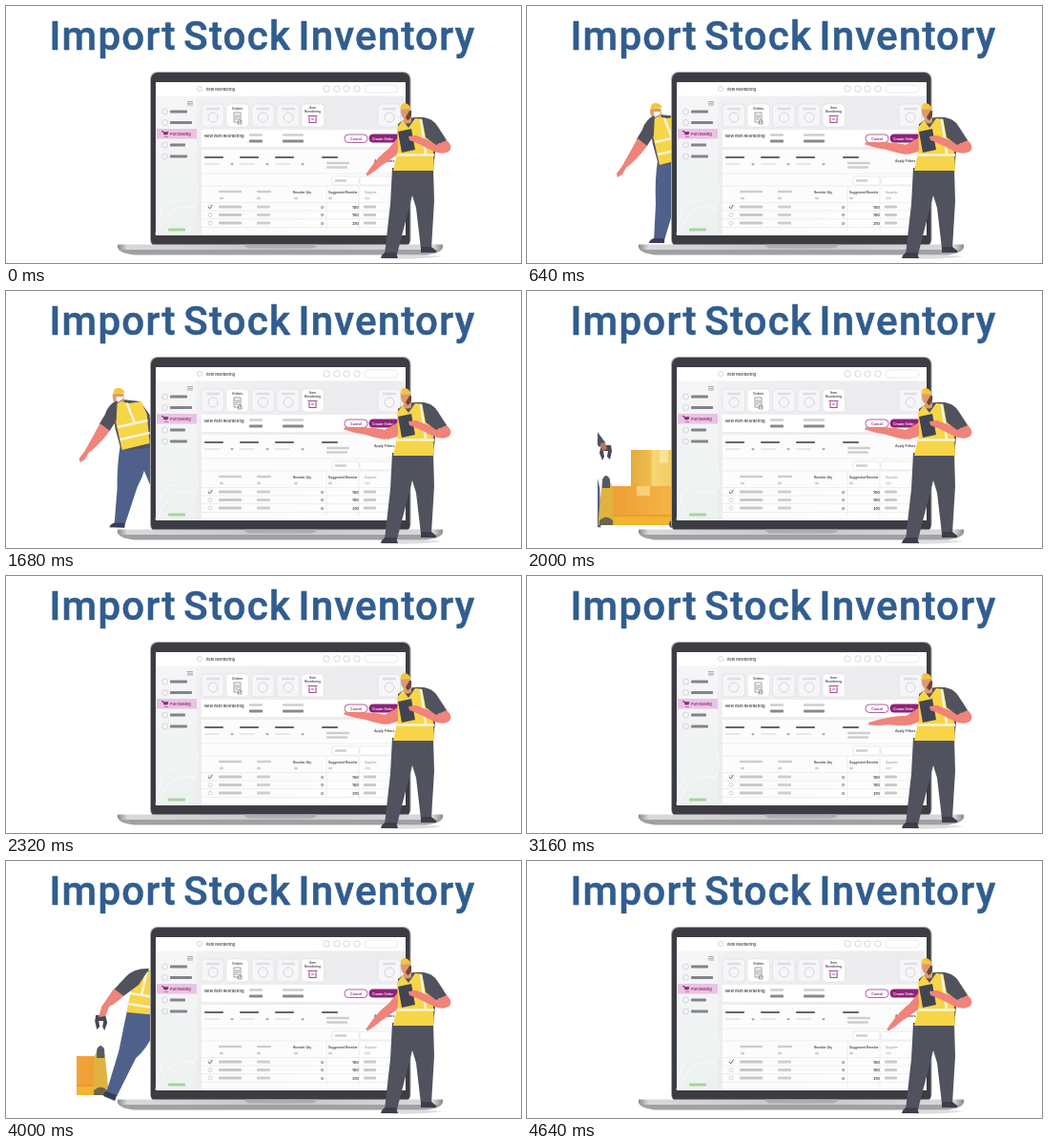
Animation of 540 by 270 pixels, one loop 9600 ms. Source, as an HTML page:

```html
<!DOCTYPE html>
<html lang="en">
<head>
<meta charset="utf-8">
<title>Import Stock Inventory</title>
<style>
html, body { margin: 0; width: 100%; height: 100%; overflow: hidden; background: #fff; }
svg { display: block; width: 100%; height: 100%; }
.title { font: 500 42px Roboto, sans-serif; letter-spacing: 1.25px; word-spacing: -4.2px; fill: #315d8f; stroke: #315d8f; stroke-width: .6; }
.ui text { font: 600 4.6px Inter, sans-serif; fill: #45424a; }
.blue { fill: #4f618b; }
.shoe { fill: #343e57; }
.vest { fill: #f7d548; }
.skin { fill: #f0837a; }
.face { fill: #dc9a70; }
.hat { fill: #f5c53a; }
.dark { fill: #50535e; }
.tape { fill: none; stroke: #f6f3dc; stroke-width: 2.6; }
</style>
</head>
<body>
<svg viewBox="0 0 540 270">
  <defs>
    <clipPath id="left"><rect x="74" y="95" width="300" height="165"/></clipPath>
    <linearGradient id="silver">
      <stop offset="0" stop-color="#88898c"/><stop offset=".03" stop-color="#d9d9db"/>
      <stop offset=".5" stop-color="#c6c6c8"/><stop offset=".97" stop-color="#d9d9db"/>
      <stop offset="1" stop-color="#88898c"/>
    </linearGradient>
    <linearGradient id="box">
      <stop offset="0" stop-color="#e3ad3c"/><stop offset=".38" stop-color="#edbd50"/>
      <stop offset=".42" stop-color="#f6d775"/><stop offset="1" stop-color="#f1c659"/>
    </linearGradient>
    <linearGradient id="crate">
      <stop offset="0" stop-color="#ef9d35"/><stop offset="1" stop-color="#f5b848"/>
    </linearGradient>
    <linearGradient id="panel" x2="1" y2="1">
      <stop offset="0" stop-color="#f4f2f5"/><stop offset=".5" stop-color="#ecebee"/>
      <stop offset="1" stop-color="#f5f4f6"/>
    </linearGradient>
    <linearGradient id="side" x2="0" y2="1">
      <stop offset="0" stop-color="#f7f6f8"/><stop offset="1" stop-color="#ecf2f0"/>
    </linearGradient>
    <g id="cart">
      <path d="M-5 162H5L6 168L4 177L1 174L2 168H-3L-2 174L-4 178L-7 170Z" fill="#454955"/>
      <rect x="26" y="167" width="54" height="38" fill="url(#box)"/>
      <path d="M56 167v14h9v-14z" fill="#f9e39a"/>
      <rect x="3" y="205" width="77" height="31" fill="url(#crate)"/>
      <path d="M32 205v10h14v-10z" fill="#f9cf78"/>
      <path d="M3 236H80V246H3Z" fill="#f2b431"/>
      <path d="M3 236H80" stroke="#d99323"/>
      <path d="M-5 208Q-5 198 0 198T7 208V238L10 246H-8V238Z" fill="#e0b340"/>
      <path d="M-4 198Q0 190 4 198V207H-4Z" fill="#56596a"/>
      <path d="M-7 241Q0 234 7 241V246H-7Z" fill="#6b6449"/>
      <circle cx="70" cy="245" r="4" fill="#4a4d57"/>
    </g>
  </defs>

  <text class="title" x="45.5" y="46">Import Stock Inventory</text>

  <g clip-path="url(#left)">
    <g id="leaver">
      <path id="rearLeg" class="blue" d="M136 164L152 162L166 205L171 246H159L153 208Z"/>
      <use href="#cart" x="169"/>
      <g id="frontLeg" class="blue"><path d="M121 163L152 161Q150 186 140 206L128 246H117L119 208Q118 182 121 163Z"/>
        <path class="shoe" d="M117 244h11v5h-16q0-3 5-5z"/></g>
      <path class="dark" d="M138 117Q149 121 154 140L168 159L162 164L148 148Z"/>
      <path d="M163 160l5-1l2 7l-5 2z" fill="#bd7562"/>
      <path class="dark" d="M112 120L124 114L142 116L152 130L153 165L122 167L116 145Z"/>
      <path class="face" d="M117 111h8v9h-8zM113 108q0 10 5 10q6-1 7-10z"/>
      <path class="hat" d="M114 107Q114 102 119 102T126 107L113 109Z"/>
      <path class="vest" d="M113 122L121 116L131 118L143 116L149 129L152 160L123 167L117 140Z"/>
      <path class="tape" d="M118 143L150 136M121 156L152 149M128 118L136 138"/>
      <path class="dark" d="M118 115Q109 118 105 130L99 140L110 147L117 136Z"/>
      <path class="skin" d="M100 139L110 147Q99 162 88 170L84 177L79 180L78 176L84 168Z"/>
    </g>
    <g id="comer">
      <use href="#cart" transform="matrix(-1 0 0 1 99 0)"/>
      <path class="blue" d="M148 165L172 162L176 204L180 246H169L164 208Z"/>
      <path class="blue" d="M127 156H160L154 182Q147 198 136 207L116 247L105 243L118 200Z"/>
      <path class="shoe" d="M105 242l11 4l-2 6l-12-5q0-4 3-5z"/>
      <path class="dark" d="M137 116Q150 112 164 120L160 160H128Z"/>
      <path class="vest" d="M134 122L151 115L165 121L160 162L126 159Z"/>
      <path class="tape" d="M130 139L162 144M128 150L160 155M147 117L142 141"/>
      <path class="face" d="M152 111h9v10h-9zM153 108h13q0 8-6 8q-6 0-7-8z"/>
      <path class="hat" d="M151 109Q152 101 159 101T166 109z"/>
      <path class="dark" d="M150 113Q135 112 126 121L113 135L123 142L139 130Z"/>
      <path class="skin" d="M113 134L123 142Q114 150 108 153L104 163L97 164L100 153Z"/>
    </g>
  </g>

  <path d="M394 263Q420 260 458 263Q430 267 394 265Z" fill="#dedee0"/>
  <rect x="151" y="69" width="273.5" height="184" rx="8" fill="#a6a7aa"/>
  <rect x="152" y="70" width="271.5" height="183" rx="7" fill="#3c3c42"/>
  <g class="ui">
    <rect x="157" y="80" width="262" height="161" fill="url(#panel)"/>
    <rect x="157" y="80" width="43" height="161" fill="url(#side)"/>
    <path d="M157 240Q164 192 185 207T200 184M159 240Q171 202 200 214" fill="none" stroke="#f8fafa"/>
    <rect x="157" y="80" width="262" height="14.5" fill="#fff"/>
    <rect x="158" y="129" width="42" height="10.5" fill="#e9c3e2"/>
    <rect x="205" y="130" width="214" height="18" fill="#fff"/>
    <rect x="205" y="151" width="214" height="90" fill="#fff" opacity=".85"/>
    <path d="M205 176H419M205 189H419M205 206.5H419M205 215H419M205 223.5H419M205 232.5H419M370 189V236M336 189V236" stroke="#e6e4e8" stroke-width=".6"/>
    <g id="parts"></g>
    <path d="M163 131.5h1.8l1 3.5h3.4l.8-2.5h-4.6z" fill="#8c2a78" stroke="#8c2a78" stroke-width=".7"/>
    <path d="M167 137v1M169 137v1" stroke="#8c2a78"/>
    <path d="M316.5 115.5h10M318 116.5v6h7v-6M320 119h3" fill="none" stroke="#a8478f" stroke-width="1.1"/>
    <path d="M239 112h7v10h-7zM240 115h5M240 117h5M240 119h3M244 119l3 2v3h-4z" fill="none" stroke="#77737c" stroke-width=".7"/>
    <path d="M190 100.5h6M190 102.3h6M190 104h6" stroke="#8e8c92" stroke-width=".7"/>
    <path d="M235 165.5h4l-2 2zM272 165.5h4l-2 2zM309 165.5h4l-2 2z" fill="#8d8a90"/>
    <path d="M212 211l1.5 1.8l3-4" fill="none" stroke="#555" stroke-width=".8"/>
    <rect x="355" y="135" width="24" height="8.5" rx="4" fill="#fff" stroke="#9b3b88" stroke-width=".8"/>
    <path d="M419 134.5H385a4.5 4.5 0 0 0 0 9H419z" fill="#8f2179"/>
    <g id="labels"></g>
  </g>
  <path d="M117 250.5H458V254Q456 259 441 261H134Q119 259 117 254Z" fill="url(#silver)"/>
  <path d="M118 256H457Q453 260 441 261.5H134Q122 260 118 256Z" fill="#a0a1a4"/>
  <path d="M250 250.5h76q-1 4-6 4h-64q-5 0-6-4z" fill="#adaeb1"/>

  <g id="guide">
    <path class="dark" d="M405 170H448L449 205L446 255H435L430 212L426 199L410 261H397L403 208Z"/>
    <path d="M397 259h12l2 6h-18q1-4 4-6zM435 253h11l5 4v2h-16z" fill="#3c3e49"/>
    <path id="upperArm" class="skin"/>
    <path id="forearm" class="skin" d="M0-5Q10-5 22-3L31-3L43-1.5L43 1L32 3Q15 6 0 5Q-6 0 0-5Z"/>
    <path class="dark" d="M411 124Q421 115 438 117Q449 121 452 133L448 173H407L411 154Z"/>
    <path class="face" d="M417 112h8v10q-4 3-8 0zM414 108h10q1 9-4 11q-5 0-6-7z"/>
    <path d="M419 117l4-7h2q1 8-4 10z" fill="#6b4637"/>
    <path class="hat" d="M414 107Q414 102 418 102T425 108L413 109Z"/>
    <path class="vest" d="M410 128L416 120L422 128L429 118L439 119L447 136L449 173H406L411 150Z"/>
    <path class="tape" d="M410 156.5H449M435 119L440 155"/>
    <path class="skin" d="M454 138L461 140Q470 148 464 153Q457 157 447 152L431 144L423 141L422 137L430 136L448 143L455 145Z"/>
    <path class="dark" d="M436 117Q447 117 453 127L462 141L451 146L440 138Z"/>
    <path d="M411 132l14-3l4 22l-14 3z" fill="#414552"/>
    <path class="skin" d="M434 138L430 136L422 137L423 141L434 145Z"/>
  </g>
</svg>
<script>
const LOOP = 9600;
const $ = id => document.getElementById(id);
const clamp = v => Math.max(0, Math.min(1, v));
const span = (t, a, b) => clamp((t - a) / (b - a));
const smooth = p => p * p * (3 - 2 * p);
const mix = (a, b, p) => a + (b - a) * p;

// Screen contents
const bar = (x, y, w, fill = '#cfcdd1', h = 2.4) =>
  `<rect x="${x}" y="${y - h / 2}" width="${w}" height="${h}" rx=".8" fill="${fill}"/>`;
const ring = (x, y, r) => `<circle cx="${x}" cy="${y}" r="${r}" fill="none" stroke="#c9c6cc" stroke-width=".7"/>`;
const pill = (x, y, w, h, r, fill = '#fff') =>
  `<rect x="${x}" y="${y}" width="${w}" height="${h}" rx="${r}" fill="${fill}" stroke="#dddae0" stroke-width=".6"/>`;
const label = (x, y, s, size = 4.6, fill = '#45424a', anchor = 'start') =>
  `<text x="${x}" y="${y}" text-anchor="${anchor}" style="font-size:${size}px;fill:${fill}">${s}</text>`;

let parts = ring(203, 87, 2.6) + pill(376, 83, 35, 8, 4);
for (const x of [336, 347, 357, 368]) parts += ring(x, 87, 3.2);
for (const [y, w] of [[111, 18], [122.5, 23], [146, 16], [158, 18]])
  parts += ring(166.5, y, 3) + bar(172, y, w, '#85838a', 3);
for (const x of [205, 231, 257.5, 284, 310, 390]) {
  const lit = x === 231 || x === 310;
  parts += pill(x, 103, 23.5, 24, 4, lit ? '#fff' : '#f6f5f7');
  if (!lit) parts += ring(x + 12, 117, 5) + bar(x + 5, 108, 14, '#dfdde1');
}
for (const [x, w] of [[255, 14], [290, 22]])
  parts += bar(x, 135.5, w) + bar(x, 142, w, '#8b8990', 3);
for (const x of [208, 245, 282])
  parts += bar(x, 159, 20, '#67656b', 2) + bar(x, 166, 16, '#e2e0e4', 1.6);
parts += bar(331, 159, 17, '#67656b', 2) + bar(336, 165, 24) + bar(336, 169.5, 22);
parts += pill(342, 179, 28, 9, 2) + pill(371, 179, 50, 9, 2) + bar(345, 183.5, 12);
parts += bar(223, 195, 24) + bar(263, 195, 15) + bar(376, 202, 6, '#e0dee2');
for (const x of [224, 263, 302, 338]) parts += bar(x, 202, 4, '#d1cfd4');
for (const y of [211, 219.5, 228])
  parts += bar(223, y, 24, '#c9c7cc', 3) + bar(263, y, 14, '#d0ced3', 3) + bar(375, y, 13, '#cbc9ce', 3) + ring(214, y, 2);
parts += bar(170, 235, 18, '#a8d59a', 3);
$('parts').innerHTML = parts;

let labels = label(210, 89, 'Item Reordering', 3.9) + label(172, 136, 'Purchasing', 4, '#8c2a78')
  + label(242.5, 109, 'Orders', 3.4, '#45424a', 'middle')
  + label(321.5, 108, 'Item', 3.2, '#45424a', 'middle') + label(321.5, 112, 'Reordering', 3.2, '#45424a', 'middle')
  + label(208, 137.5, 'New Item Reordering', 4.1) + label(367, 140.6, 'Cancel', 3.5, '#8f2179', 'middle')
  + label(384, 140.6, 'Create Order', 3.5, '#fff') + label(386, 164, 'Apply Filters', 3.5)
  + label(301, 196.5, 'Reorder Qty', 3.3) + label(338, 196.5, 'Suggested Reorder', 3.3)
  + label(376, 196.5, 'Supplier', 3.2, '#aaa8ad');
[100, 100, 210].forEach((n, i) => {
  const y = 212.5 + i * 8.5;
  labels += label(333, y, '0', 4, '#333', 'end') + label(370, y, n, 4, '#333', 'end');
});
$('labels').innerHTML = labels;

const place = (id, transform) => $(id).setAttribute('transform', transform);

function drawLeaver(t) {
  const left = 1 - span(t, 40, 1000);
  const shift = 4 + 85 * left * left - 205 * span(t, 1640, 2320) ** 1.3;
  const swing = 6 * Math.sin(shift * Math.PI / 16);
  $('leaver').style.display = t > 40 && t < 2320 ? '' : 'none';
  place('leaver', `translate(${shift} 0)`);
  place('frontLeg', `rotate(${-swing} 136 168)`);
  place('rearLeg', `rotate(${swing} 142 168)`);
}

function drawComer(t) {
  $('comer').style.display = t > 3400 && t < 4640 ? '' : 'none';
  place('comer', `translate(${(t - 4000) * .21} 0)`);
}

function drawArm(t) {
  const lift = smooth(span(t, 40, 600)) - smooth(span(t, 2840, 3800));
  const x = mix(404, 398, lift), y = mix(154, 151, lift);
  const angle = mix(-42, 9, lift), reach = mix(35, 44, lift) / 43;
  place('forearm', `translate(${x} ${y}) rotate(${180 + angle}) scale(${reach} 1)`);
  $('upperArm').setAttribute('d', `M411 138L${x - 3} ${y - 4}Q${x - 5} ${y + 3} ${x + 2} ${y + 5}L420 150Z`);
}

function frame(now) {
  const t = now % LOOP;
  drawLeaver(t);
  drawComer(t);
  drawArm(t);
  requestAnimationFrame(frame);
}
frame(performance.now());
</script>
</body>
</html>
```
